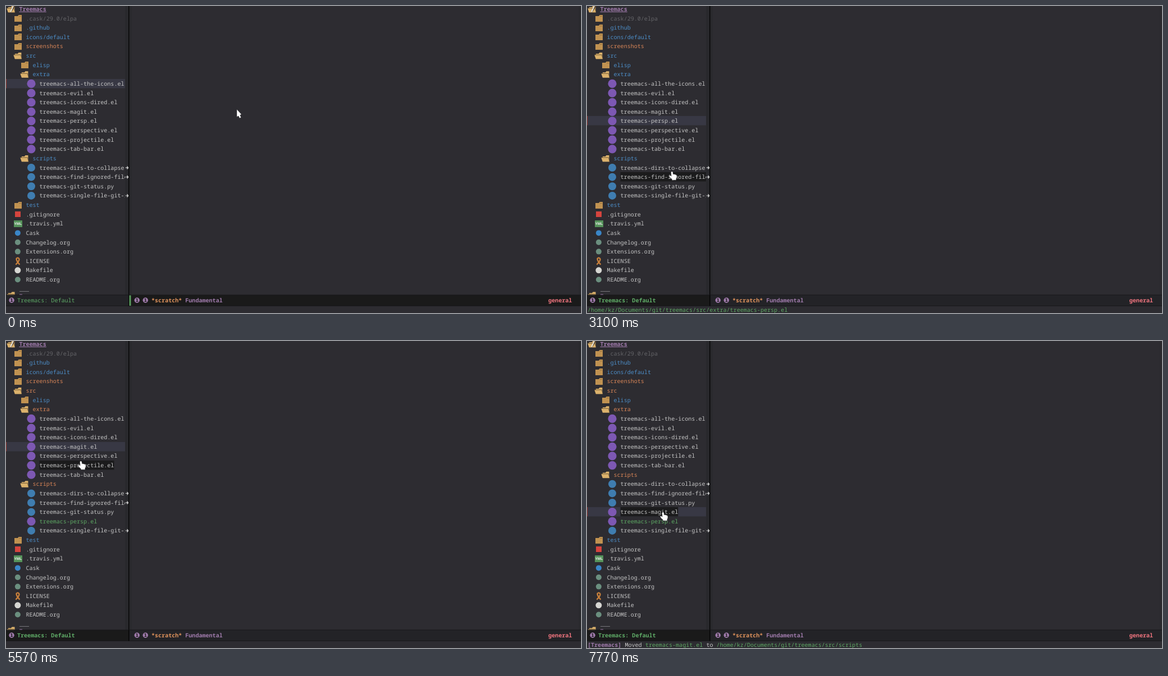
These frames come from a looping animation (1024 px wide and 547 px high, 8 s). An HTML page with a canvas:

```html
<!DOCTYPE html>
<html lang="en">
<head>
<meta charset="utf-8">
<title>Tree drag and drop</title>
<style>
html, body { margin: 0; width: 100%; height: 100%; overflow: hidden; background: #2d2c31; }
canvas { display: block; }
</style>
</head>
<body>
<canvas id="stage" width="1024" height="547"></canvas>
<script>
const ctx = document.getElementById('stage').getContext('2d');
const LOOP = 8000, ROW = 16.62, TOP = -3, CELL = 6.042, EDGE = 212;
const FONT = '10.07px "Noto Sans Mono", "DejaVu Sans Mono", monospace';
const C = {
  bg: '#2d2c31', fringe: '#29292d', band: '#383844', hover: '#1b1b1c', dark: '#1a1a1a', dim: '#232327',
  text: '#c6c6c6', blue: '#4d8ec8', orange: '#d98658', green: '#5ea964', grey: '#646468',
  purple: '#a07bac', scratch: '#e0935c', red: '#f2757f', folder: '#c09251', open: '#dcb26c'
};
const HOME = '/home/kz/Documents/git/treemacs/src/';
const fileName = name => `treemacs-${name}`;

// Each entry changes only the listed parts of the state.
const timeline = [
  { t: 0, x: 411, y: 184, hand: false, hover: -1, band: 8, mark: 8, focus: false,
    moved: [], src: C.blue, scripts: C.blue, fresh: '', echo: '' },
  { t: 1800, hand: true, x: 127, y: 198, hover: 12 },
  { t: 2430, band: 12, mark: 12, focus: true },
  { t: 2600, x: 130, y: 209 },
  { t: 2800, x: 136, y: 240, hover: -1, echo: 'drag persp.el' },
  { t: 2930, x: 146, y: 283, hover: 17 },
  { t: 3100, x: 146, y: 295, hover: 18 },
  { t: 3400, moved: ['persp.el'], band: 20, mark: 19, echo: 'move persp.el' },
  { t: 3670, band: 19, src: C.orange, fresh: 'persp.el' },
  { t: 4170, x: 141, y: 274, hover: 17 },
  { t: 4330, x: 130, y: 206, hover: 12 },
  { t: 4530, x: 127, y: 190, hover: 11, scripts: C.orange },
  { t: 4700, x: 126, y: 193 },
  { t: 4900, x: 123, y: 180 },
  { t: 5230, band: 11, mark: 11, echo: '' },
  { t: 5570, x: 128, y: 214, hover: 13 },
  { t: 5730, x: 141, y: 254, hover: -1, echo: 'drag magit.el' },
  { t: 5900, x: 146, y: 278, hover: 16 },
  { t: 6100, x: 146, y: 286, hover: 17 },
  { t: 6400, moved: ['magit.el', 'persp.el'], band: -1, mark: 18, echo: 'move magit.el' },
  { t: 6630, band: 18 },
  { t: 7200, x: 143, y: 290 },
  { t: 7400, x: 138, y: 297, hover: 18 },
  { t: 7570, x: 130, y: 306 },
  { t: 7770, x: 130, y: 305 }
];

function stateAt(t) {
  const s = Object.assign({}, ...timeline.filter(k => k.t <= t));
  if (t >= 670 && t < 1800) {
    const p = Math.min(10, Math.floor((t - 670) * 9 / 300 + 0.01) + 1) / 10;
    const e = p * p * (3 - 2 * p);
    s.x = 411 - 237 * e;
    s.y = 184 + 15 * e;
  }
  return s;
}

function rowsFor(s) {
  const item = (depth, icon, name, color = C.text) => ({ depth, icon, name, color });
  const file = name => item(3, name.endsWith('.py') ? 'python' : 'emacs', fileName(name),
    name === s.fresh ? C.green : C.text);
  const extra = ['all-the-icons', 'evil', 'icons-dired', 'magit', 'persp', 'perspective', 'projectile', 'tab-bar']
    .map(n => n + '.el').filter(n => !s.moved.includes(n));
  const scripts = ['dirs-to-collapse.py', 'find-ignored-files.py', 'git-status.py', 'single-file-git-status.py', ...s.moved].sort();
  return [
    item(0, 'root', 'Treemacs', C.purple),
    item(1, 'folder', '.cask/29.0/elpa', C.grey),
    item(1, 'folder', '.github', C.blue),
    item(1, 'folder', 'icons/default', C.blue),
    item(1, 'folder', 'screenshots', C.orange),
    item(1, 'open', 'src', s.src),
    item(2, 'folder', 'elisp', C.blue),
    item(2, 'open', 'extra', s.src),
    ...extra.map(file),
    item(2, 'open', 'scripts', s.scripts),
    ...scripts.map(file),
    item(1, 'folder', 'test', C.blue),
    item(1, 'git', '.gitignore'),
    item(1, 'yml', '.travis.yml'),
    item(1, 'cask', 'Cask'),
    item(1, 'org', 'Changelog.org'),
    item(1, 'org', 'Extensions.org'),
    item(1, 'ribbon', 'LICENSE'),
    item(1, 'make', 'Makefile'),
    item(1, 'org', 'README.org')
  ];
}

function box(x, y, w, h, color) {
  ctx.fillStyle = color;
  ctx.fillRect(x, y, w, h);
}

function disc(x, y, r, color) {
  ctx.fillStyle = color;
  ctx.beginPath();
  ctx.arc(x, y, r, 0, Math.PI * 2);
  ctx.fill();
}

function poly(x, y, points, color) {
  ctx.fillStyle = color;
  ctx.beginPath();
  for (let i = 0; i < points.length; i += 2) ctx.lineTo(x + points[i], y + points[i + 1]);
  ctx.closePath();
  ctx.fill();
}

function print(text, x, y, color, bold) {
  ctx.font = (bold ? 'bold ' : '') + FONT;
  ctx.fillStyle = color;
  ctx.fillText(text, x, y);
}

function openFolder(x, y) {
  poly(x, y, [-5, -3.5, 0, -3.5, 1.5, -5.5, 6.5, -5.5, 6.5, 5, -5, 5], C.open);
  poly(x, y, [-7.5, -2, 5.5, -2, 7.5, 5.5, -5, 5.5], '#6b5636');
  poly(x, y, [-7.5, -1, 5, -1, 7, 6, -5, 6], C.open);
}

const icons = {
  folder(x, y) {
    poly(Math.round(x), Math.round(y), [-6, -4, 0, -4, 1.5, -6, 7, -6, 7, 6, -6, 6], C.folder);
    box(Math.round(x) + 2, Math.round(y) - 4, 4, 0.8, '#8c6a39');
  },
  open: openFolder,
  root(x, y) {
    openFolder(x, y);
    poly(x, y, [3, -5, 7, -7, 7, -4, 1, 5, -2, 5], '#5d4a30');
    poly(x, y, [3, -5, 5.5, -6.5, 0.5, 5, -2, 5], '#f2eee4');
  },
  emacs: (x, y) => disc(x, y, 7.6, '#7d58b3'),
  python: (x, y) => disc(x, y, 7, '#3f7db0'),
  git: (x, y) => box(Math.round(x) - 5, Math.round(y) - 5, 10, 10, '#d5443e'),
  cask: (x, y) => disc(x, y, 5, '#3a86c8'),
  org: (x, y) => disc(x, y, 5, '#6b8f7f'),
  make: (x, y) => disc(x, y, 5.5, '#d6d6d2'),
  yml(x, y) {
    box(Math.round(x) - 7, Math.round(y) - 6, 15, 12, '#55925a');
    ctx.font = 'bold 6.5px "Liberation Sans", sans-serif';
    ctx.fillStyle = '#f0f0f0';
    ctx.textAlign = 'center';
    ctx.fillText('YML', x + 0.5, y + 2.2);
    ctx.textAlign = 'left';
  },
  ribbon(x, y) {
    ctx.strokeStyle = '#c9803b';
    ctx.lineWidth = 2.4;
    ctx.beginPath();
    ctx.moveTo(x - 3.5, y + 6.5);
    ctx.quadraticCurveTo(x + 4, y - 1, x + 2.3, y - 4.3);
    ctx.quadraticCurveTo(x, y - 7, x - 2.3, y - 4.3);
    ctx.quadraticCurveTo(x - 3, y - 1, x + 3.5, y + 6.5);
    ctx.stroke();
  }
};

function fringeArrow(y) {
  ctx.strokeStyle = '#e4e4e4';
  ctx.lineWidth = 1.1;
  ctx.beginPath();
  ctx.moveTo(213, y);
  ctx.lineTo(218, y);
  ctx.moveTo(215.5, y - 2.5);
  ctx.lineTo(218, y);
  ctx.lineTo(215.5, y + 2.5);
  ctx.stroke();
}

function drawTree(s) {
  ctx.save();
  ctx.beginPath();
  ctx.rect(0, 0, 219, 515);
  ctx.clip();
  box(EDGE, 0, 6, 515, C.fringe);
  if (s.band >= 0) box(1, Math.round(TOP + s.band * ROW), EDGE - 1, 16.5, C.band);
  box(0, Math.round(TOP + s.mark * ROW), 1, 16.5, '#96382f');
  rowsFor(s).forEach((row, i) => {
    const y = TOP + i * ROW, x = 23.4 + 12.06 * row.depth;
    const width = row.name.length * CELL;
    if (i === s.hover) box(x, Math.round(y), Math.min(width, EDGE - x), 16.5, C.hover);
    icons[row.icon](x - 14.6, y + 8.5);
    ctx.save();
    ctx.beginPath();
    ctx.rect(0, 0, EDGE, 515);
    ctx.clip();
    print(row.name, x, y + 12, row.color, i === 0);
    if (i === 0) box(x, 10, width, 1, C.purple);
    ctx.restore();
    if (x + width > EDGE + 1) fringeArrow(y + 8.6);
  });
  // Top edge of the next project, cut off by the mode line.
  openFolder(9, 515);
  box(24, 508, 17, 1, '#77777b');
  box(24, 513.5, 5, 1.5, C.purple);
  ctx.restore();
  box(218, 0, 1.5, 534, '#060606');
}

function badge(x) {
  disc(x, 524.3, 4.7, C.purple);
  ctx.font = 'bold 8px "DejaVu Sans", sans-serif';
  ctx.fillStyle = C.dark;
  ctx.textAlign = 'center';
  ctx.fillText('1', x, 527.2);
  ctx.textAlign = 'left';
}

function drawModeLines(focus) {
  box(0, 515, 218, 19.5, focus ? C.dark : C.dim);
  box(219.5, 515, 804.5, 19.5, focus ? C.dim : C.dark);
  box(0, 514.5, 1024, 0.8, '#151517');
  box(0, 533.8, 1024, 0.8, '#151517');
  box(218, 515, 1.5, 19.5, '#060606');
  if (!focus) box(219.5, 515.5, 3, 18.5, '#5a9c5f');
  [10, 233.3, 248.3].forEach(badge);
  print('Treemacs: Default', 20, 528, '#5fab67', focus);
  print('*scratch*', 259, 528, C.scratch, true);
  print('Fundamental', 319.3, 528, C.purple, true);
  print('general', 965.8, 528, C.red, true);
}

function drawEcho(echo) {
  if (!echo) return;
  const [action, name] = echo.split(' ');
  const parts = action === 'drag'
    ? [[HOME + 'extra/' + fileName(name), C.green]]
    : [['[Treemacs]', C.purple, true], [' Moved ', C.text], [fileName(name), C.green],
       [' to ', C.text], [HOME + 'scripts', C.green]];
  let x = 1;
  for (const [text, color, bold] of parts) {
    print(text, x, 544.6, color, bold);
    x += text.length * CELL;
  }
}

function drawPointer({ x, y, hand }) {
  const outline = hand
    ? [3.5, 1, 4.5, 0, 6, 0, 7, 1, 7.3, 4.5, 11, 5, 13.8, 6.5, 14, 10, 12.8, 13, 12.8, 15.2,
       5.2, 15.2, 5.2, 13.5, 2.2, 11, 0.2, 8, 0.7, 6.8, 2.2, 6.8, 4, 8.2]
    : [0, 0, 8.3, 9, 5.8, 10.5, 7.8, 14.5, 5, 16, 3, 12, 0, 13.5];
  poly(x, y, outline, '#ffffff');
  ctx.strokeStyle = 'rgba(20, 20, 22, 0.6)';
  ctx.lineWidth = 0.7;
  ctx.stroke();
}

function frame(now) {
  const s = stateAt(now % LOOP);
  ctx.textRendering = 'geometricPrecision';
  box(0, 0, 1024, 547, C.bg);
  box(219.5, 0, 4, 515, C.fringe);
  box(1020, 0, 4, 515, C.fringe);
  drawTree(s);
  drawModeLines(s.focus);
  drawEcho(s.echo);
  drawPointer(s);
  requestAnimationFrame(frame);
}
frame(performance.now());
</script>
</body>
</html>
```
